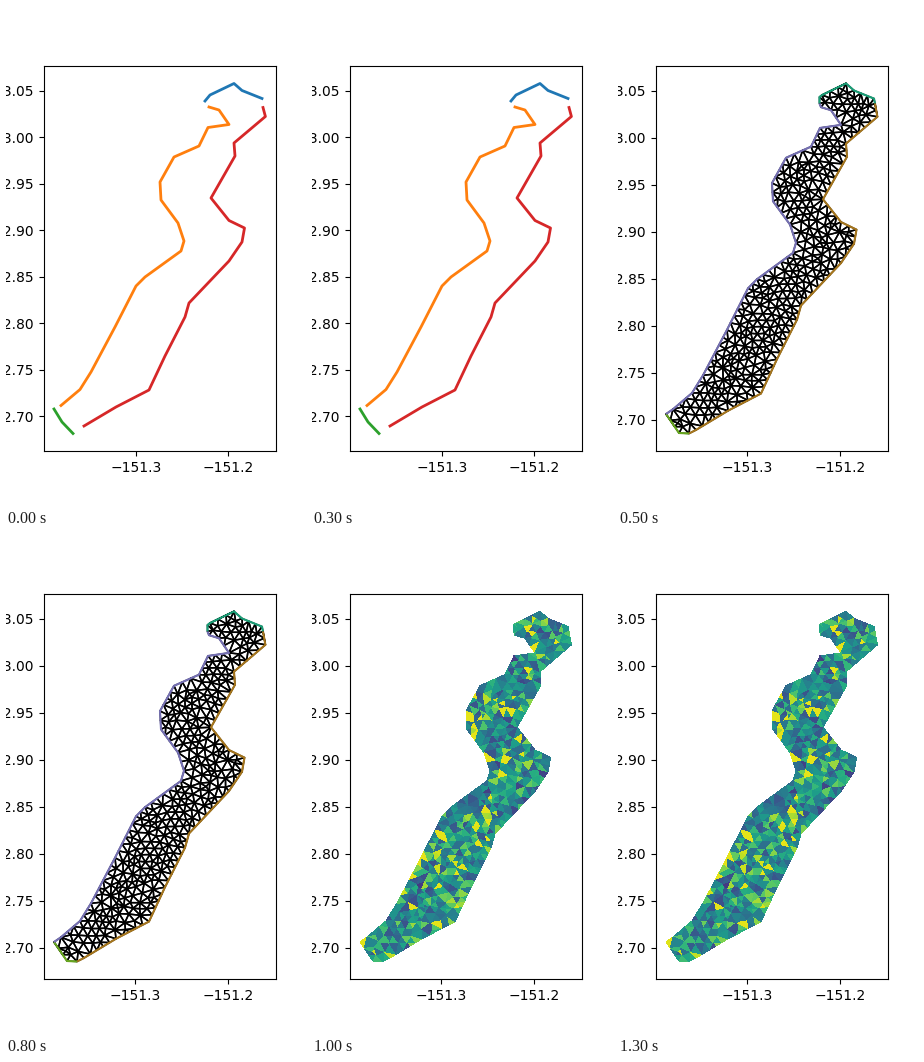
Recreate the animation shown at these times as a matplotlib script. Size 300 by 500 pixels, loop 1500 ms.

```python
import numpy as np
import matplotlib.pyplot as plt
from matplotlib.animation import FuncAnimation
from matplotlib.collections import LineCollection, PolyCollection
from matplotlib.path import Path
from matplotlib.tri import Triangulation

# Corners of the four shoreline parts in stage pixels, y pointing down
inflow = [(199, 95), (204, 89), (228, 77.5), (236, 84.5), (256, 92.5)]
west = [(203, 101), (213, 104), (223, 118.5), (202, 121.5), (193, 140),
        (168, 151), (154, 176), (155, 194), (172, 217), (178, 235),
        (175, 245), (139, 271), (130, 280), (109, 321), (85, 366),
        (74, 383.5), (55, 399.5)]
outflow = [(48, 403), (56, 416), (67, 427.5)]
east = [(257, 101.5), (259.4, 110.5), (228, 137), (229, 150), (205, 192),
        (223, 214.5), (238.5, 222), (236, 236), (223, 255), (183, 297),
        (179, 311), (159, 350), (143, 384), (110, 401), (78, 420)]

TOP_TICK = 84.95
STEP_LINES, STEP_MESH = 46.45, 47.0
SIZE = 8.0


def rescale(points):
    p = np.array(points, float)
    p[:, 1] = TOP_TICK + (p[:, 1] - TOP_TICK) * STEP_MESH / STEP_LINES
    return p


def subdivide(points):
    """Split every segment into pieces of about SIZE, keeping the corners."""
    p = np.asarray(points, float)
    parts = []
    for a, b in zip(p[:-1], p[1:]):
        n = max(1, round(np.hypot(*(b - a)) / SIZE))
        parts.append(np.linspace(a, b, n, endpoint=False))
    return np.vstack([*parts, p[-1:]])


def triangulate(points, outline):
    tri = Triangulation(*points.T).triangles
    inside = outline.contains_points(points[tri].mean(axis=1))
    return Triangulation(*points.T, tri[inside])


def build_mesh(ring, rng):
    outline = Path(ring)
    rows = np.arange(70, 440, SIZE * 0.866)
    grid = np.array([(x + (i % 2) * SIZE / 2, y) for i, y in enumerate(rows)
                     for x in np.arange(40, 270, SIZE)])
    grid += rng.uniform(-0.45, 0.45, grid.shape) * SIZE
    gap = np.hypot(*(grid[:, None] - ring[None]).transpose(2, 0, 1)).min(axis=1)
    grid = grid[outline.contains_points(grid) & (gap > 0.6 * SIZE)]
    points = np.vstack([ring, grid])
    n = len(ring)
    # Pull inner points toward the mean of their neighbours
    for _ in range(2):
        a, b = triangulate(points, outline).edges.T
        total, count = np.zeros_like(points), np.zeros((len(points), 1))
        for i, j in ((a, b), (b, a)):
            np.add.at(total, i, points[j])
            np.add.at(count, i, 1)
        mean = total / np.maximum(count, 1)
        points[n:] = np.where(count > 0, (points + mean) / 2, points)[n:]
    return triangulate(points, outline)


rng = np.random.default_rng(8)
north, south = (201.5, 97.5), (48, 408)
ne, se = (257, 97.5), (71, 427.5)
sides = [subdivide(s) for s in (
    [north, (201.5, 91), *rescale(inflow)[1:], ne],
    [ne, *rescale(east)[1:], se],
    [se, (61, 427), south],
    [south, *rescale(west)[::-1], north],
)]
ring = np.vstack([s[:-1] for s in sides])
mesh = build_mesh(ring, rng)
values = np.clip(0.16 + rng.gamma(3, 0.125, len(mesh.triangles)), 0, 0.96)
side_colors = plt.get_cmap("Dark2")([0, 6, 4, 2])

fig, ax = plt.subplots(figsize=(3, 5), dpi=100)


def set_axes(step, x_ticks):
    ax.set_xlim(37.5, 270)
    ax.set_ylim(445, 60)
    ax.set_xticks(x_ticks, ["\u2212151.3", "\u2212151.2"])
    ax.set_yticks(TOP_TICK + step * np.arange(8),
                  [f"{63.05 - 0.05 * k:.2f}" for k in range(8)])


def draw_lines():
    for line in (inflow, west, outflow, east):
        ax.plot(*np.transpose(line), lw=2)


def draw_mesh():
    corners = np.c_[mesh.x, mesh.y][mesh.triangles]
    ax.add_collection(PolyCollection(corners, facecolors="none",
                                     edgecolors="black", linewidths=1.1))
    ax.add_collection(LineCollection(sides, colors=side_colors,
                                     linewidths=1.5, zorder=3))


def draw_cells():
    ax.tripcolor(mesh, facecolors=values, cmap="viridis", vmin=0, vmax=1)


stages = (draw_lines, draw_mesh, draw_cells)


def update(i):
    ax.clear()
    stages[i]()
    if i == 0:
        set_axes(STEP_LINES, [130.4, 222.4])
    else:
        set_axes(STEP_MESH, [129.4, 222.4])
    return []


anim = FuncAnimation(fig, update, frames=3, interval=500, repeat=True)
plt.show()
```
